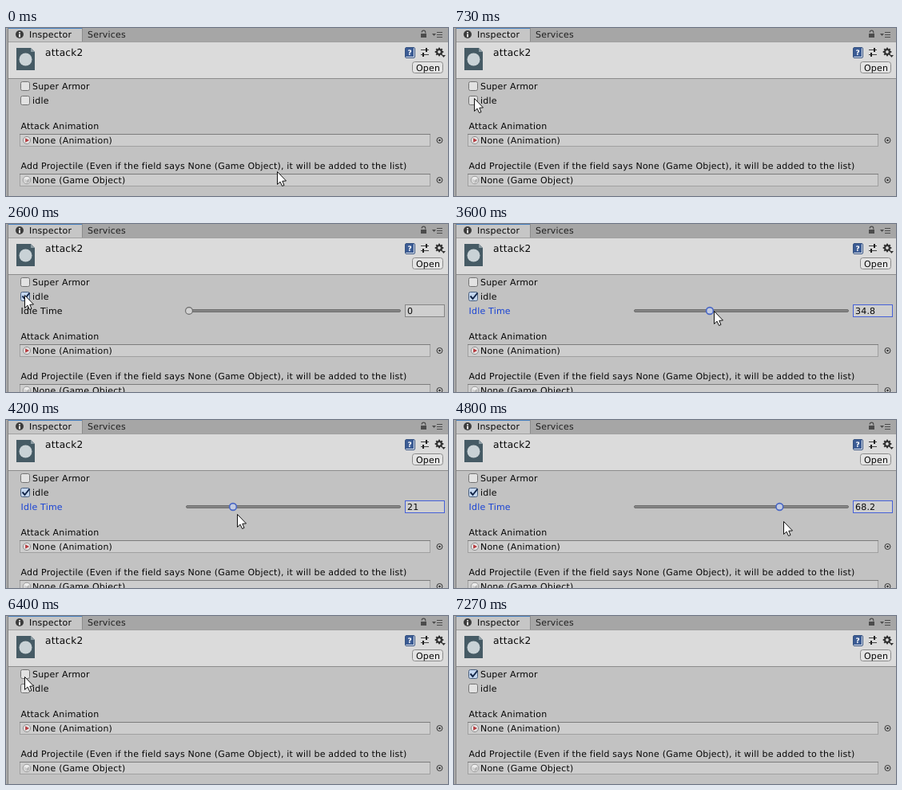
An HTML page with a canvas that plays this animation: 553 by 211 pixels, repeating every 7670 ms.

```html
<!DOCTYPE html>
<html lang="en">
<head>
<meta charset="utf-8">
<title>Inspector</title>
<style>
html, body { margin: 0; width: 100%; height: 100%; overflow: hidden; background: #c2c2c2; }
canvas { display: block; width: 553px; height: 211px; }
</style>
</head>
<body>
<canvas id="stage" width="553" height="211"></canvas>
<script>
const ctx = document.getElementById('stage').getContext('2d');
const LOOP = 7670, TICKS = 115;
const BLUE = '#1a44d4', INK = '#080808';

// Pointer path: tick, x, y
const PATH = [
  [0, 340, 181], [9, 14, 97], [12, 30, 86], [14, 30, 86], [23, 27, 72],
  [31, 27, 72], [35, 24, 90], [41, 24, 90], [49, 266, 111], [51, 266, 111],
  [54, 326, 110], [58, 460, 114], [63, 290, 119], [65, 254, 121],
  [72, 413.35, 128], [74, 429.3, 128], [75, 425, 128], [77, 425, 128],
  [86, 22, 90], [91, 22, 90], [98, 25, 74], [102, 25, 74], [109, 111, 214]
];

function pointer(n) {
  let i = 0;
  while (i < PATH.length - 2 && n > PATH[i + 1][0]) i++;
  const [n0, x0, y0] = PATH[i], [n1, x1, y1] = PATH[i + 1];
  const k = Math.min(1, (n - n0) / (n1 - n0));
  const e = k * k * (3 - 2 * k);
  return { x: x0 + (x1 - x0) * e, y: y0 + (y1 - y0) * e };
}

function rect(x, y, w, h, color) {
  ctx.fillStyle = color;
  ctx.fillRect(x, y, w, h);
}

function text(s, x, y, color = INK, size = 11) {
  ctx.font = size + 'px "DejaVu Sans", sans-serif';
  ctx.fillStyle = color;
  ctx.fillText(s, x, y);
}

function poly(points, fill, stroke) {
  ctx.beginPath();
  points.forEach(([x, y]) => ctx.lineTo(x, y));
  ctx.closePath();
  if (fill) { ctx.fillStyle = fill; ctx.fill(); }
  if (stroke) { ctx.strokeStyle = stroke; ctx.lineWidth = 1; ctx.stroke(); }
}

function disc(x, y, r, fill, stroke, width = 1) {
  ctx.beginPath();
  ctx.arc(x, y, r, 0, 7);
  if (fill) { ctx.fillStyle = fill; ctx.fill(); }
  if (stroke) { ctx.strokeStyle = stroke; ctx.lineWidth = width; ctx.stroke(); }
}

function box(x, y, w, h, r, fill, stroke) {
  ctx.beginPath();
  ctx.roundRect(x + 0.5, y + 0.5, w - 1, h - 1, r);
  ctx.fillStyle = fill;
  ctx.fill();
  ctx.strokeStyle = stroke;
  ctx.lineWidth = 1;
  ctx.stroke();
}

function tabs() {
  rect(0, 0, 553, 17, '#a6a6a6');
  rect(3, 0, 92, 17, '#c6c6c6');
  rect(3, 0, 92, 1, '#4a82c0');
  rect(95, 0, 1, 17, '#8c8c8c');
  disc(17, 8, 5, '#3c3c3c');
  rect(16, 5, 2, 1.5, '#e8e8e8');
  rect(16, 7.5, 2, 4, '#e8e8e8');
  text('Inspector', 29, 12);
  text('Services', 102, 12, '#202020');
  rect(519, 7, 7, 5, '#4c4c4c');
  ctx.beginPath();
  ctx.arc(522.5, 5.5, 2.3, Math.PI, 0.4);
  ctx.strokeStyle = '#4c4c4c';
  ctx.lineWidth = 1.2;
  ctx.stroke();
  poly([[533, 7], [538, 7], [535.5, 10]], '#4c4c4c');
  for (let i = 0; i < 3; i++) rect(539, 5 + i * 3, 7, 1, '#4c4c4c');
}

function gear(x, y) {
  ctx.save();
  ctx.translate(x, y);
  for (let i = 0; i < 8; i++) {
    rect(-1, -5.3, 2, 3, '#303030');
    ctx.rotate(Math.PI / 4);
  }
  ctx.restore();
  disc(x, y, 2.9, null, '#303030', 2);
}

function header() {
  rect(3, 17, 550, 46, '#dbdbdb');
  rect(3, 17, 550, 1, '#a0a0a0');
  rect(3, 63, 550, 1, '#8c8c8c');

  poly([[13, 25], [31, 25], [36, 30], [36, 53], [13, 53]], '#465b65');
  poly([[31, 25], [36, 30], [31, 30]], '#8c9ca3');
  disc(24.5, 39.5, 8, '#c9d2d6');
  text('attack2', 49, 35, INK, 12.2);

  box(499, 24, 13, 14, 1.5, '#e6ebf3', '#33507f');
  rect(500, 25, 10, 11, '#3c5c94');
  ctx.font = 'bold 9px "DejaVu Sans", sans-serif';
  ctx.fillStyle = '#fff';
  ctx.fillText('?', 502.5, 33.5);

  rect(519, 27, 10, 1, '#404040');
  rect(519, 33, 10, 1, '#404040');
  rect(525, 25, 2, 5, '#202020');
  rect(521, 31, 2, 5, '#202020');
  gear(542, 30);
  poly([[545, 34], [550, 34], [547.5, 37]], '#303030');

  box(508, 42, 39, 15, 3, '#e4e4e4', '#8a8a8a');
  text('Open', 513, 54);
}

function toggle(label, y, on, pressed) {
  text(label, 33, y + 10);
  const fill = pressed ? '#5674a2' : on ? '#c4d6ee' : '#e2e2e2';
  box(18, y, 12, 12, 2, fill, on || pressed ? '#4a607f' : '#727272');
  if (!on) return;
  ctx.beginPath();
  ctx.moveTo(20.5, y + 5.5);
  ctx.lineTo(23.5, y + 9);
  ctx.lineTo(29.5, y + 1.5);
  ctx.strokeStyle = '#14274a';
  ctx.lineWidth = 2;
  ctx.stroke();
}

function objectField(label, value, y, icon) {
  text(label, 18.5, y - 6);
  rect(17, y, 514, 16, '#a0a0a0');
  rect(17, y, 514, 1, '#7c7c7c');
  rect(18, y + 1, 512, 14, '#cdcdcd');
  icon(26, y + 8);
  text(value, 33, y + 12);
  disc(542.5, y + 8, 3.5, null, '#333');
  disc(542.5, y + 8, 1.3, '#333');
}

function clipIcon(x, y) {
  disc(x, y, 4.6, '#e4e4e4', '#8e8e8e');
  poly([[x - 1.8, y - 2.8], [x + 3, y], [x - 1.8, y + 2.8]], '#b5383c');
}

function cubeIcon(x, y) {
  disc(x, y, 4.8, '#ededed', '#9a9a9a');
  poly([[x - 3.5, y - 2], [x, y], [x, y + 4], [x - 3.5, y + 2]], '#cfcfcf');
  poly([[x + 3.5, y - 2], [x, y], [x, y + 4], [x + 3.5, y + 2]], '#b6b6b6');
}

function slider(value, focused) {
  text('Idle Time', 18.5, 113, focused ? BLUE : INK);
  box(225, 107, 269, 4, 2, '#848484', '#6f6f6f');
  const x = 229 + value * 2.615;
  disc(x, 109, 4.4, focused ? '#c3cbe0' : '#d2d2d2', focused ? '#4866c4' : '#686868', focused ? 1.6 : 1.1);
  rect(499, 101, 50, 16, focused ? '#4560d8' : '#858585');
  rect(500, 102, 48, 14, '#cfcfcf');
  text(String(+value.toFixed(1)), 502, 113);
}

function arrow(x, y) {
  ctx.save();
  ctx.translate(Math.round(x) - 0.5, Math.round(y) - 0.5);
  poly([[0, 0], [0, 16], [3.6, 12.7], [6, 18], [8.5, 17], [6.3, 11.8], [11, 11.5]], '#fff', '#111');
  ctx.restore();
}

function draw(n) {
  const p = pointer(n);
  const open = n >= 39 && n < 92;
  const focused = n >= 52 && n < 92;
  const value = n < 52 ? 0 : n >= 74 ? 74.3 : Math.min(100, Math.max(0, (p.x - 235) / 2.615));
  const shift = open ? 18 : 0;

  ctx.textRendering = 'geometricPrecision';
  ctx.letterSpacing = '0.2px';
  rect(0, 0, 553, 211, '#c2c2c2');
  tabs();
  header();
  rect(0, 0, 2, 211, '#aaaaaa');
  rect(2, 0, 1, 211, '#808080');

  toggle('Super Armor', 67, (n >= 25 && n < 30) || n >= 100, false);
  toggle('idle', 85, open, n === 38 || n === 90 || n === 91);
  if (open) slider(value, focused);
  objectField('Attack Animation', 'None (Animation)', 133 + shift, clipIcon);
  objectField('Add Projectile (Even if the field says None (Game Object), it will be added to the list)',
    'None (Game Object)', 183 + shift, cubeIcon);
  arrow(p.x, p.y);
}

const start = performance.now();
function frame() {
  const t = (performance.now() - start) % LOOP;
  draw(Math.min(TICKS - 1, Math.floor(t * TICKS / LOOP + 0.06)));
  requestAnimationFrame(frame);
}
frame();
</script>
</body>
</html>
```
